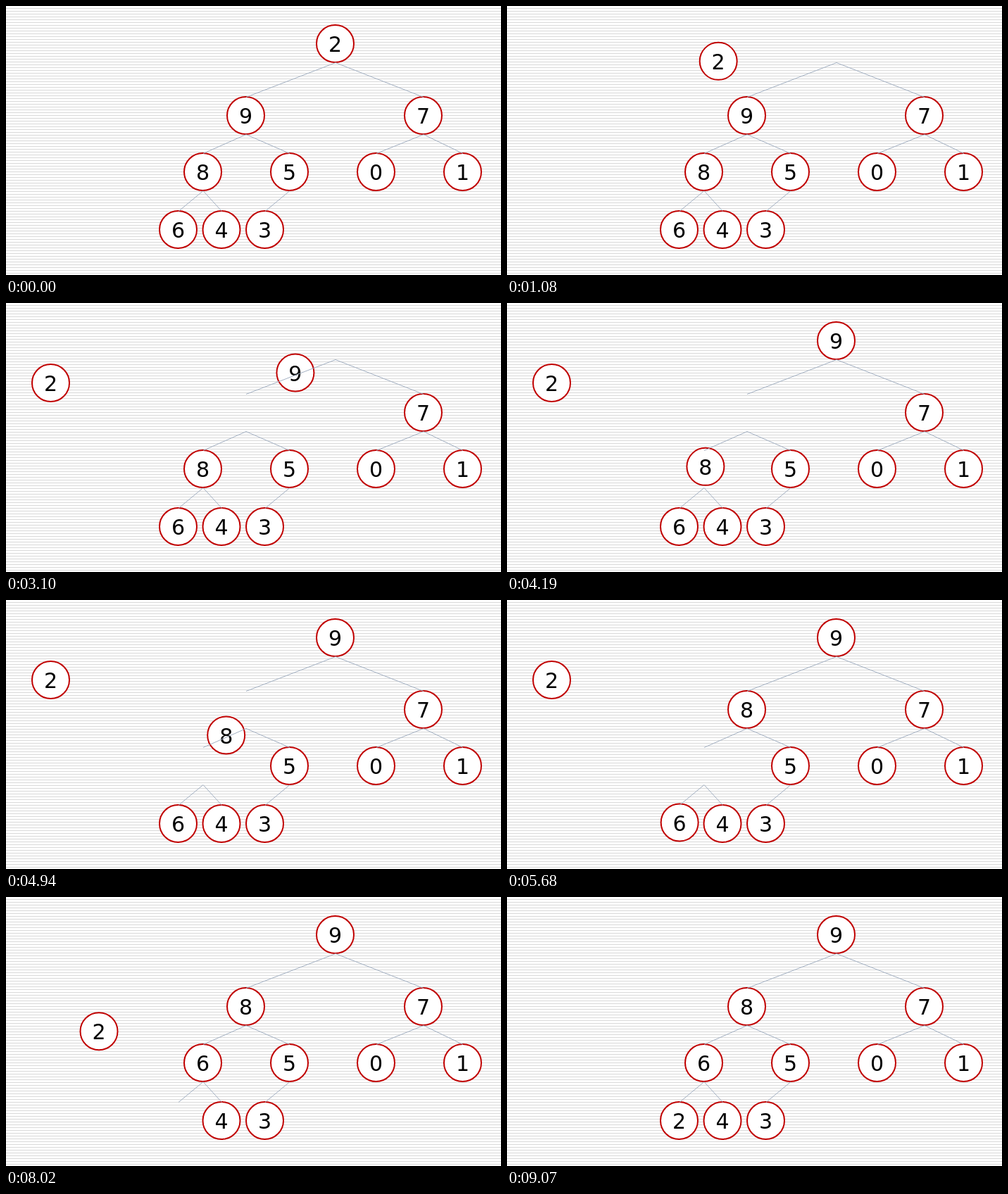
Animation of 703 by 382 pixels, one loop 9470 ms. Source, as an HTML page:

```html
<!DOCTYPE html>
<html lang="en">
<head>
<meta charset="utf-8">
<title>Heap: sift down</title>
<style>
  html, body { margin: 0; width: 100%; height: 100%; overflow: hidden; background: #fff; }
  svg {
    display: block; width: 703px; height: 382px;
    background: repeating-linear-gradient(#fff 0 3px, #d9d9d9 3px 4px);
  }
  circle { fill: #fff; stroke: #c00000; stroke-width: 2; }
  text { font: 30px "DejaVu Sans", Verdana, sans-serif; text-anchor: middle; fill: #000; }
  line { stroke: #a3b0c2; stroke-width: 1; }
</style>
</head>
<body>
<svg viewBox="0 0 703 382">
  <g id="nodes"></g>
  <g id="edges"></g>
</svg>
<script>
  const LOOP = 9470, FIRST = 270, LAST = 9070;
  const STEP = (LAST - FIRST) / 67;
  const MOVE = 1600;
  const RADIUS = 26.5;

  const heap = [..."2978501643"];
  const aside = { x: 63.5, y: 113.5 };

  // Per tree level: leftmost x, spacing, y
  const levels = [
    [467.5, 0, 53.5], [340.5, 252, 155.5], [279.5, 123, 235.5], [244.5, 61.5, 317.5]
  ];

  const slots = heap.map((_, i) => {
    const depth = Math.floor(Math.log2(i + 1));
    const [x, gap, y] = levels[depth];
    return { x: x + gap * (i + 1 - 2 ** depth), y };
  });

  // The root steps aside, larger children rise, then it drops into the gap
  const moves = [
    { value: 2, start: 350, from: slots[0], to: aside },
    { value: 9, start: 2170, from: slots[1], to: slots[0] },
    { value: 8, start: 4020, from: slots[3], to: slots[1] },
    { value: 6, start: 5525, from: slots[7], to: slots[3] },
    { value: 2, start: 7350, from: aside, to: slots[7] }
  ];

  function add(parent, tag, attrs = {}) {
    const el = document.createElementNS("http://www.w3.org/2000/svg", tag);
    for (const key in attrs) el.setAttribute(key, attrs[key]);
    return parent.appendChild(el);
  }

  const layer = document.getElementById("nodes");
  const edges = document.getElementById("edges");
  const nodes = {};

  function place(value, x, y) {
    nodes[value].setAttribute("transform", `translate(${x} ${y})`);
  }

  heap.forEach((value, i) => {
    const { x, y } = slots[i];
    nodes[value] = add(layer, "g");
    add(nodes[value], "circle", { r: RADIUS });
    add(nodes[value], "text", { y: 11.7 }).textContent = value;
    place(value, x, y);
    if (i === 0) return;
    const parent = slots[(i - 1) >> 1];
    add(edges, "line", { x1: parent.x + 0.5, y1: parent.y + 27, x2: x + 0.5, y2: y - 26 });
  });

  const ease = p => p * p * (3 - 2 * p);

  // Playback advances in even steps, with a rest at both ends
  function hold(t) {
    const held = FIRST + Math.floor((t + 25 - FIRST) / STEP) * STEP;
    return Math.min(LAST, Math.max(0, held));
  }

  function draw(now) {
    const t = hold(now % LOOP);
    const placed = new Set();
    for (const { value, start, from, to } of moves) {
      if (t < start && placed.has(value)) continue;
      const p = ease(Math.min(1, Math.max(0, (t - start) / MOVE)));
      place(value, from.x + (to.x - from.x) * p, from.y + (to.y - from.y) * p);
      placed.add(value);
    }
  }

  const begin = performance.now();
  function tick() {
    draw(performance.now() - begin);
    requestAnimationFrame(tick);
  }
  tick();
</script>
</body>
</html>
```
